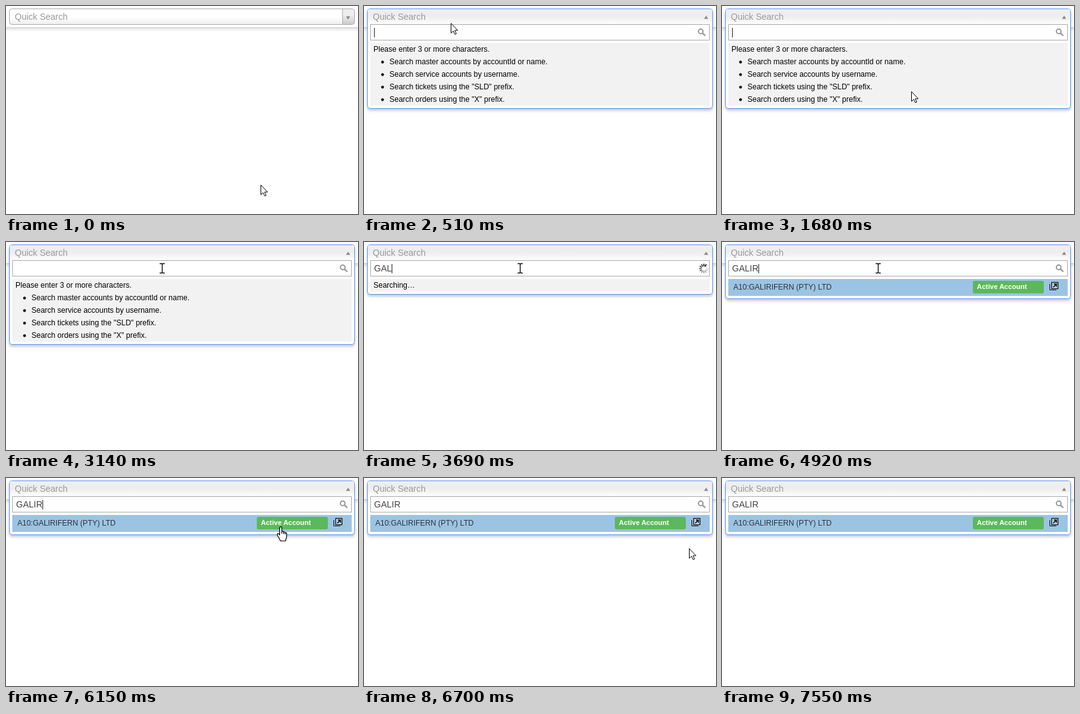
An HTML page that plays this animation: 560x332 px, repeating every 7.63 s.

```html
<!DOCTYPE html>
<html lang="en">
<head>
<meta charset="utf-8">
<title>Quick search</title>
<style>
  html, body { margin: 0; width: 100%; height: 100%; overflow: hidden; background: #fff; }
  svg { display: block; width: 560px; height: 332px; font: 12px "Liberation Sans", Arial, sans-serif; }
  text { white-space: pre; }
  #panel { filter: drop-shadow(0 3px 2px rgba(0, 0, 0, .22)); }
</style>
</head>
<body>
<svg viewBox="0 0 560 332">
  <defs>
    <linearGradient id="bar" x2="0" y2="1"><stop stop-color="#e4e4e4"/><stop offset="1" stop-color="#fff"/></linearGradient>
    <linearGradient id="shut" x2="0" y2="1"><stop offset=".5" stop-color="#fff"/><stop offset="1" stop-color="#eee"/></linearGradient>
    <linearGradient id="open" x2="0" y2="1"><stop offset=".5" stop-color="#eee"/><stop offset="1" stop-color="#fff"/></linearGradient>
    <linearGradient id="button" x2="0" y2="1"><stop offset=".4" stop-color="#eee"/><stop offset="1" stop-color="#ccc"/></linearGradient>
  </defs>

  <rect y="35" width="560" height="6" fill="url(#bar)"/>
  <rect y="34" width="560" height="1" fill="#ccc"/>

  <g id="closed">
    <rect x="5.5" y="4.5" width="549" height="25" rx="4" fill="url(#shut)"/>
    <path d="M535 5H551a3 3 0 0 1 3 3V26a3 3 0 0 1-3 3H535Z" fill="url(#button)"/>
    <path d="M535.5 5V29" stroke="#aaa"/>
    <rect x="5.5" y="4.5" width="549" height="25" rx="4" fill="none" stroke="#aaa"/>
    <path d="M541 16.5h6.6l-3.3 5Z" fill="#858585"/>
  </g>

  <g id="opened">
    <rect id="panel" x="5.5" y="4.5" width="549" rx="4" fill="#fff" stroke="#5897fb"/>
    <path d="M6 30V8a3 3 0 0 1 3-3H551a3 3 0 0 1 3 3V30Z" fill="url(#open)"/>
    <path d="M541 20.5h6.6l-3.3-5Z" fill="#858585"/>
    <rect x="10.5" y="29.5" width="539" height="25" fill="#fff" stroke="#aaa"/>
    <text id="query" x="16" y="47" font-size="14" fill="#444"></text>
    <rect id="caret" y="35" width="1" height="15" fill="#222"/>
    <g id="lens" fill="none" stroke="#999" stroke-width="2">
      <circle cx="535.7" cy="40.5" r="3.7"/>
      <path d="M538.6 43.3L543 47.5" stroke-width="2.4"/>
    </g>
    <g id="spinner" stroke="#000" stroke-width="1.7" stroke-linecap="round"></g>

    <g id="help">
      <rect x="10" y="59" width="540" height="100" fill="#f2f2f2"/>
      <text x="15" y="73">Please enter 3 or more characters.</text>
    </g>
    <g id="searching">
      <rect x="10" y="59" width="540" height="20" fill="#f2f2f2"/>
      <text x="15" y="73">Searching…</text>
    </g>
    <g id="result">
      <rect x="10" y="59" width="540" height="27" fill="#9bc4e4"/>
      <text x="18" y="76" fill="#333">A10:GALIRIFERN (PTY) LTD</text>
      <rect x="399" y="62" width="113" height="20" rx="3" fill="#5cb85c"/>
      <text x="405.5" y="75" font-size="11" font-weight="bold" fill="#fff">Active Account</text>
      <g fill="none" stroke="#111">
        <path d="M521.5 67V76.5H532"/>
        <rect x="524.5" y="64.5" width="10" height="10" fill="#c4dcf0" stroke-width="1.3"/>
        <path d="M527 72.2L531.5 67.7M528 67.2H532V71.5" stroke-width="1.7"/>
      </g>
    </g>
  </g>

  <text x="14" y="22" font-size="14" fill="#999">Quick Search</text>

  <g id="cursor">
    <path id="arrow" d="M.5 .7V16.2L4 12.9L6.6 18.3L8.9 17.2L6.4 12H11.2Z" fill="#fff" stroke="#000"/>
    <g id="beam" fill="none">
      <path d="M-3.5 -7.5H-1Q.5 -7.5 .5 -6Q.5 -7.5 2 -7.5H4.5M.5 -6V6M-3.5 7.5H-1Q.5 7.5 .5 6Q.5 7.5 2 7.5H4.5" stroke="#000" stroke-width="1.3"/>
    </g>
    <path id="hand" d="M-1.6 13V1.6a1.7 1.7 0 0 1 3.4 0V7.6c.9-.9 2.6-.5 2.9.8 1-.7 2.4-.2 2.6 1 1-.4 2.2.3 2.2 1.6V15c0 2.8-1.6 4.2-1.8 7.5H-.6C-.9 19.4-3.2 17.6-4.6 14.6-5.8 12.3-5.6 11-4.6 10.7-3.4 10.4-2.4 11.6-1.6 13ZM1.8 7.6V11M4.7 8.4V11.4M7.3 9.4V12" fill="#fff" stroke="#000" stroke-width="1.2" stroke-linejoin="round"/>
  </g>
</svg>
<script>
const LOOP = 7630, OPEN = 510, SEARCH = 3690, FOUND = 4840, GONE = 7000, BLINK = 525;
const WORD = "GALIR";
const KEYS = [3390, 3540, 3690, 3770, 3850];
const HINTS = [
  "Search master accounts by accountId or name.",
  "Search service accounts by username.",
  'Search tickets using the "SLD" prefix.',
  'Search orders using the "X" prefix.'
];
// Pointer moves: first step, last step, step count, waypoints
const MOVES = [
  [70, 360, 5, [[405, 285], [270, 150], [138, 27]]],
  [830, 1370, 8, [[138, 27], [185, 40], [255, 60], [314, 87]]],
  [1520, 1830, 5, [[314, 87], [308, 130], [275, 160]]],
  [1980, 2210, 4, [[275, 160], [258, 90], [248, 42]]],
  [5380, 6070, 10, [[248, 42], [268, 33], [325, 55], [397, 78]]],
  [6150, 6530, 6, [[397, 78], [437, 78], [470, 77], [490, 75], [508, 74], [520, 74], [525, 74]]],
  [6700, 6930, 4, [[525, 74], [508, 150], [470, 303]]]
];

const $ = id => document.getElementById(id);
const show = (id, on) => $(id).setAttribute("display", on ? "inline" : "none");

function add(parent, tag, attrs, content = "") {
  const el = document.createElementNS("http://www.w3.org/2000/svg", tag);
  for (const k in attrs) el.setAttribute(k, attrs[k]);
  el.textContent = content;
  return parent.appendChild(el);
}

HINTS.forEach((hint, i) => {
  const y = 93 + 20 * i;
  add($("help"), "circle", { cx: 29.5, cy: y - 3.5, r: 2.2 });
  add($("help"), "text", { x: 40.5, y }, hint);
});

const spokes = Array.from({ length: 12 }, (_, i) =>
  add($("spinner"), "path", { d: "M0 -4.2V-7", transform: `translate(540.7 42.3) rotate(${i * 30})` }));

function along(points, u) {
  const s = u * (points.length - 1);
  const i = Math.min(points.length - 2, Math.floor(s));
  return [0, 1].map(k => Math.round(points[i][k] + (points[i + 1][k] - points[i][k]) * (s - i)));
}

function pointer(t) {
  let pos = MOVES[0][3][0];
  for (const [start, end, count, points] of MOVES) {
    if (t < start) break;
    const step = Math.floor((t - start) / (end - start) * (count - 1) + 0.01);
    pos = along(points, Math.min(1, (step + 1) / count));
  }
  return pos;
}

function shape(t, y) {
  if (t < OPEN) return y < 31 ? "hand" : "arrow";
  if (y > 29 && y < 56) return "beam";
  return t >= FOUND && y >= 56 && y < 87 ? "hand" : "arrow";
}

function draw(t) {
  const open = t >= OPEN, found = t >= FOUND, busy = t >= SEARCH && !found;
  show("closed", !open);
  show("opened", open);
  show("help", t < SEARCH);
  show("searching", busy);
  show("spinner", busy);
  show("lens", !busy);
  show("result", found);
  $("panel").setAttribute("height", found ? 86 : busy ? 79 : 159);

  const typed = KEYS.filter(k => k <= t);
  $("query").textContent = WORD.slice(0, typed.length);
  const last = typed.length ? typed[typed.length - 1] : OPEN;
  show("caret", Math.floor((t - last) / BLINK) % 2 === 0);
  if (open) $("caret").setAttribute("x", 16 + Math.round(typed.length ? $("query").getComputedTextLength() : 0));

  const head = Math.floor((t - 4380) / 76.5 + 0.01) + 34;
  spokes.forEach((s, i) => s.setAttribute("opacity", Math.max(0.12, 1 - ((head - i) % 12) * 0.085)));

  const [x, y] = pointer(t), kind = shape(t, y);
  for (const k of ["arrow", "beam", "hand"]) show(k, k === kind);
  show("cursor", t < GONE);
  $("cursor").setAttribute("transform", `translate(${x} ${y})`);
}

const begin = performance.now();
function frame() {
  draw((performance.now() - begin) % LOOP);
  requestAnimationFrame(frame);
}
frame();
</script>
</body>
</html>
```
